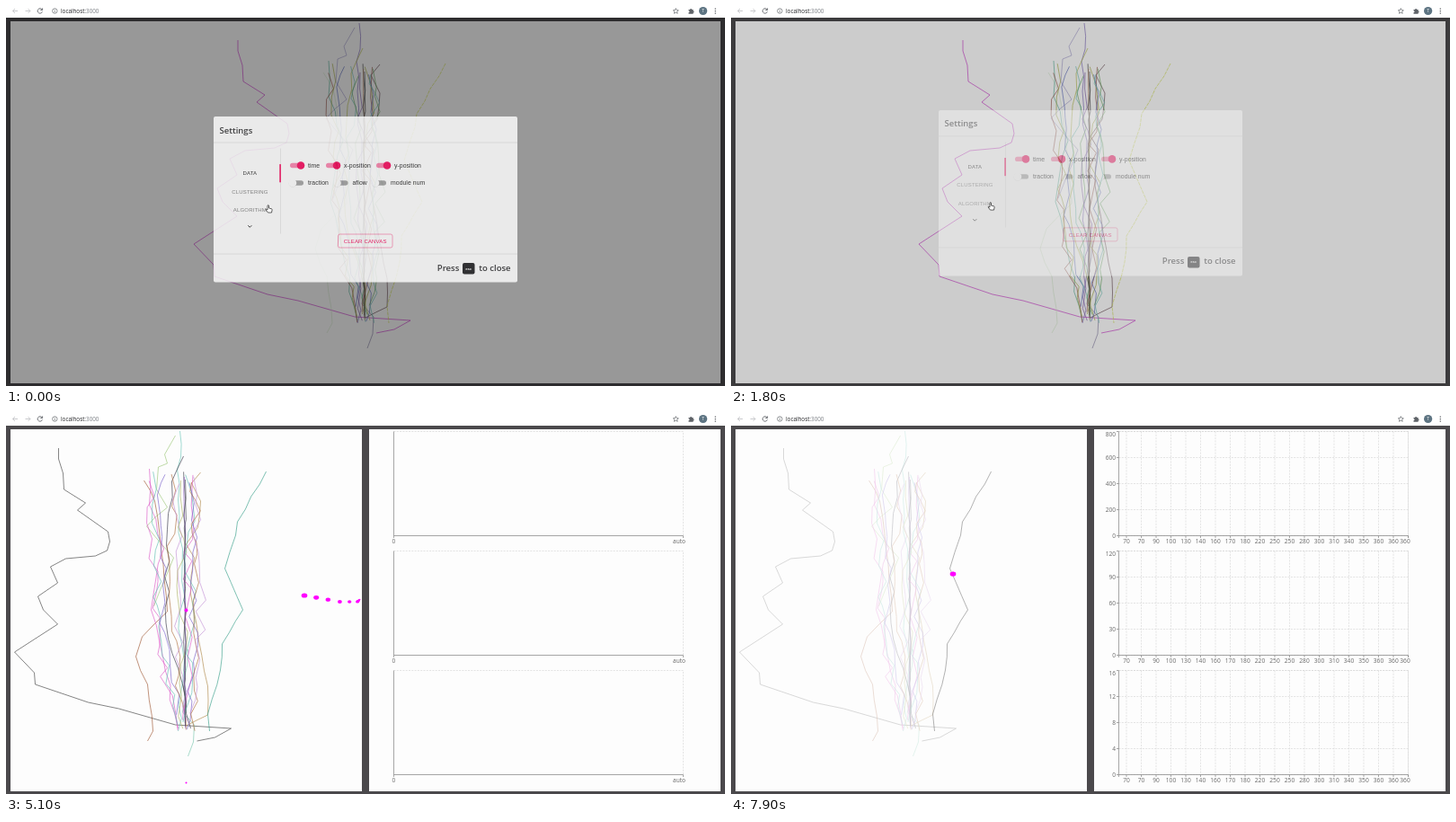
Recreate the animation shown at these times as an HTML page. Size 800 by 423 pixels, loop 8 s.

```html
<!DOCTYPE html>
<html lang="en">
<head>
<meta charset="utf-8">
<title>Trajectory canvas</title>
<style>
  html, body { margin: 0; width: 100%; height: 100%; overflow: hidden; background: #fff; }
  svg { display: block; width: 100%; height: 100%; }
  .ui { font-family: "Open Sans", "Noto Sans", sans-serif; }
  .arial { font-family: "Liberation Sans", Arial, sans-serif; }
  .tab, .btn { font-size: 6px; letter-spacing: .17px; text-anchor: middle; }
  .btn { fill: #f50057; }
  .tick { font-size: 6.6px; fill: #666; }
  .axis { fill: none; stroke: #888; stroke-width: .75; }
  .grid { fill: none; stroke: #d9d9d9; stroke-width: .7; stroke-dasharray: 2 1.3; }
  .line { fill: none; stroke-width: .66; stroke-linejoin: round; }
</style>
</head>
<body>
<svg viewBox="0 0 800 423" preserveAspectRatio="none">
  <defs>
    <clipPath id="tabsClip"><rect x="235" y="179.5" width="72" height="61.5"/></clipPath>
    <clipPath id="panelClip"><rect id="panelRect" x="5" y="17" width="790" height="403"/></clipPath>
  </defs>

  <rect width="800" height="423" fill="#fff"/>
  <rect y="13" width="800" height="410" fill="#4b494c"/>
  <rect x="5" y="17" width="790" height="403" fill="#fdfdfd"/>
  <g clip-path="url(#panelClip)">
    <g id="lines"></g>
    <g id="trail" fill="#f0f"></g>
  </g>
  <g id="split" class="ui">
    <rect x="396" y="17" width="8" height="403" fill="#4b494c"/>
  </g>
  <rect id="backdrop" y="13" width="800" height="410"/>

  <g id="dialog">
    <rect x="231" y="126.5" width="338" height="184.5" rx="2" fill="#fff"/>
    <path d="M231 155.5H569M231 279.5H569M305.5 162V257" stroke="#e2e2e2" stroke-width=".8"/>
    <g class="ui" font-size="9.5" font-weight="600" fill="#2a2a2c">
      <text x="237.5" y="145">Settings</text>
      <text x="479.8" y="298">Press</text>
      <text x="526.3" y="298">to close</text>
    </g>
    <rect x="508" y="289.5" width="13.5" height="12.5" rx="2" fill="#18181a"/>
    <text class="ui" x="514.7" y="297" font-size="4.2" font-weight="700" fill="#fff" text-anchor="middle">esc</text>
    <g class="arial">
      <g clip-path="url(#tabsClip)"><g id="tabs"></g></g>
      <path id="up" d="M269.3 172.2l2-2 2 2" fill="none" stroke="#222"/>
      <path id="down" d="M269.3 247.8l2 2 2-2" fill="none" stroke="#222"/>
      <g id="switches" font-size="6.85" letter-spacing=".06" fill="#222"></g>
      <g id="analysis">
        <rect id="analysisBox" x="368" y="194" width="63.5" height="15" rx="2" fill="#f50057" stroke="#f50057" stroke-width=".8"/>
        <text class="btn" x="399.7" y="203.7">ANALYSIS MODE</text>
      </g>
      <rect x="369.5" y="257.5" width="60.5" height="15" rx="2" fill="none" stroke="#fa80ab" stroke-width=".8"/>
      <text class="btn" x="399.7" y="267.2">CLEAR CANVAS</text>
    </g>
  </g>

  <g id="status">
    <path d="M0 416H264q2 0 2 2v5H0z" fill="#dee1e6"/>
    <text class="ui" x="2" y="421.7" font-size="5.6" fill="#5f6368">Connecting...</text>
  </g>

  <g id="chrome" fill="none" stroke="#5f6368" stroke-width=".9">
    <path d="M13 5.5H7.5M10 3L7.5 5.5 10 8M21.5 5.5H27M24.5 3L27 5.5 24.5 8" stroke="#c4c6c9"/>
    <path id="reload" d="M40 3.8A2.7 2.7 0 1 0 40.4 6.4M40.6 2.4V4.6H38.4"/>
    <path id="stop" d="M35.4 3L40.4 8M40.4 3L35.4 8"/>
    <circle cx="54.3" cy="5.5" r="2.7" stroke-width=".7"/>
    <path d="M54.3 5.2V7.1M54.3 3.8V4.5" stroke-width=".7"/>
    <path d="M745.3 2.6l.9 2 2.1.2-1.6 1.4.5 2.1-1.9-1.1-1.9 1.1.5-2.1-1.6-1.4 2.1-.2z" stroke-width=".7"/>
    <path d="M759.5 4h1.6a1 1 0 0 1 2 0h1.5v1.6a1 1 0 0 1 0 2v1.1h-5.1v-1.4a1 1 0 0 0 0-2z" fill="#5f6368" stroke="none"/>
    <circle cx="775.6" cy="5.5" r="4.6" fill="#5d7482" stroke="none"/>
    <path d="M789.3 2.4v1.3M789.3 4.9v1.3M789.3 7.4v1.3" stroke-width="1.3"/>
    <g class="ui" stroke="none">
      <text x="61" y="7.8" font-size="6.3" fill="#202124">localhost<tspan fill="#777b80">:3000</tspan></text>
      <text x="775.6" y="7.4" font-size="5" fill="#fff" text-anchor="middle">T</text>
    </g>
  </g>

  <path id="hand" d="M-1.5 -4q.9-.8 1.5 .1V-1l3 .8q.8.3.6 1.2L3 4H-1L-3.4 .9q0-1 1-.6l.9.8z"
        fill="#fff" stroke="#222" stroke-width=".7"/>
</svg>
<script>
const LOOP = 8000, STEP = 100, SPLIT = 4700;
const $ = id => document.getElementById(id);
const clamp = v => Math.max(0, Math.min(1, v));
const ramp = (t, from, to) => clamp((t - from) / (to - from));
const ease = v => v * v * (3 - 2 * v);
const mix = (a, b, k) => a + (b - a) * k;
const show = (el, on) => el.setAttribute('display', on ? 'inline' : 'none');
const set = (el, attrs) => { for (const k in attrs) el.setAttribute(k, attrs[k]); return el; };

function add(parent, tag, attrs, text) {
  const el = set(document.createElementNS('http://www.w3.org/2000/svg', tag), attrs);
  if (text !== undefined) el.textContent = text;
  return parent.appendChild(el);
}

let seed = 2024;
function rnd() {
  seed = (seed + 0x6D2B79F5) | 0;
  let r = Math.imul(seed ^ (seed >>> 15), 1 | seed);
  r = (r + Math.imul(r ^ (r >>> 7), 61 | r)) ^ r;
  return ((r ^ (r >>> 14)) >>> 0) / 4294967296;
}
const wobble = size => (rnd() - .5) * size;

// Jagged walk through a few key points, with a joint about every 17 px
function walk(keys, jitter) {
  const pts = keys.split(' ').map(p => p.split(',').map(Number));
  const out = [pts[0]];
  pts.slice(1).forEach(([x, y], i) => {
    const [px, py] = pts[i];
    const n = Math.max(1, Math.round(Math.hypot(x - px, y - py) / 17));
    for (let j = 1; j < n; j++) out.push([mix(px, x, j / n) + wobble(jitter), mix(py, y, j / n)]);
    out.push([x, y]);
  });
  return out.map(p => p.map(v => v.toFixed(1)).join()).join(' ');
}

// Strand of the middle bundle; side runs from -1 (left edge) to 1 (right edge)
function strand(side, jitter) {
  const pts = [];
  for (let y = 64 + rnd() * 14; y < 353; y += 9 + rnd() * 14) {
    const k = ramp(y, 60, 352);
    const width = side < 0 ? 32 * (1 - k ** 3) + 6 : 13 + 9 * Math.sin(k * 3) * k - 6 * k ** 4;
    pts.push(`${(398.5 + side * width + wobble(jitter)).toFixed(1)},${y.toFixed(1)}`);
  }
  return pts.join(' ');
}

const wideTones = ['#9a5a50', '#a9b04c', '#6372c0', '#444', '#74c6bb', '#72b06c', '#8560ac', '#c09070'];
const splitTones = ['#dc5cc8', '#64c0b4', '#7a62cc', '#444450', '#b07040', '#c493d6', '#b0b468', '#8a5ac0'];
const others = add($('lines'), 'g', {});
const walks = [];
function addWalk(points, wide, split) {
  walks.push({ el: add(others, 'polyline', { class: 'line', points }), wide, split });
}

addWalk('258,38 258,50 263,66 264,84 288,99 279,107 313,131 315,142 312,152 299,158 266,161 249,170 257,188 235,203 241,218 257,234 209,265 231,288 232,301 291,321 325,328 388,346 450,350 432,360 412,364', '#cc3ecb', '#454545');
addWalk(walk('353,74 365,97 372,150 379,220 351,248 344,270 357,301 363,353 357,364', 4), '#d9ecd2', '#a05a38');
addWalk(walk('393,19 394,48 390,62 391,95 396,150 394,310 391,353', 7), '#7f6cba', '#70c8ba');
addWalk(walk('388,24 376,45 379,55 369,59 367,84 379,104 356,125 386,160 364,214', 3), '#a9a2d0', '#9fc87c');
addWalk(walk('402,381 408,365 409,346 396,332 402,262', 4), '#8b86a8', '#7cc9b0');
addWalk(walk('359,61 359,101 375,150 361,218 374,270 391,350', 8), '#5db39c', '#dc5cc8');
addWalk(walk('397,47 384,75 378,146 380,250 405,350', 7), '#b8bf55', '#3b3b4c');
addWalk(walk('416,65 406,77 416,97 413,126 400,145 409,160 405,200 424,303 424,335 400,347', 3), '#6c5058', '#b08a4c');
for (let i = 0; i < 14; i++) {
  const central = i % 4 === 3;
  addWalk(strand(central ? 0 : i / 6.5 - 1, central ? 3 : 13), wideTones[i % 8], splitTones[i % 8]);
}
const hovered = add($('lines'), 'polyline', {
  class: 'line', points: walk('489,64 457,120 455,135 443,172 463,218 440,256 438,285 424,334 426,353', 2)
});

// Dialog parts
const tabs = ['DATA', 'CLUSTERING', 'ALGORITHM', 'THRESHOLD', 'OPTIONS'].map((name, i) =>
  add($('tabs'), 'text', { class: 'tab', x: 271.4, y: 191.9 + i * 20.2 }, name));
const marker = add($('tabs'), 'rect', { x: 304.3, width: 1.6, height: 20.2, fill: '#f50057' });

function toggle(x, y, name, on) {
  const g = $('switches');
  add(g, 'rect', { x: x - (on ? 20 : 19), y: y - 2.7, width: on ? 16 : 14, height: 5.4, rx: 2.7, fill: on ? '#fa7fab' : '#9e9e9e' });
  if (!on) add(g, 'circle', { cx: x - 17, cy: y + .5, r: 4.4, fill: '#000', opacity: .08 });
  add(g, 'circle', { cx: x - (on ? 8 : 17), cy: y, r: 4.3, fill: on ? '#f50057' : '#fff' });
  add(g, 'text', { x, y: y + 2.2 }, name);
}
toggle(336, 181, 'time', true);
toggle(376, 181, 'x-position', true);
toggle(432, 181, 'y-position', true);
toggle(336, 200.5, 'traction', false);
toggle(385.5, 200.5, 'aflow', false);
toggle(428, 200.5, 'module num', false);

// Charts
const xLabels = '70 70 90 100 130 140 160 170 180 220 250 250 280 300 310 340 350 360 360 360'.split(' ');
const empty = add($('split'), 'g', {});
const filled = add($('split'), 'g', {});
const label = (parent, x, y, text, anchor = 'middle') =>
  add(parent, 'text', { class: 'tick', x, y, 'text-anchor': anchor }, text);

[200, 30, 4].forEach((unit, n) => {
  const base = 135.5 + n * 133, top = base - 116;
  let grid = '', marks = '';
  xLabels.forEach((text, i) => {
    const x = Math.min(440 + i * 16.5, 753.5);
    grid += `M${x} ${top}V${base}`;
    marks += `M${x} ${base}v2.5`;
    label(filled, Math.min(x, 750), base + 8.2, text);
  });
  for (let i = 0; i < 5; i++) {
    const y = base - i * 29;
    grid += `M431.5 ${y}H753.5`;
    marks += `M431.5 ${y}h-2.5`;
    label(filled, 428, (i < 4 ? y : y + 3) + 2.2, unit * i, 'end');
  }
  add(filled, 'path', { class: 'grid', d: grid });
  add(filled, 'path', { class: 'axis', d: marks });
  label(empty, 431.5, base + 8.2, '0');
  label(empty, 749, base + 8.2, 'auto');
  add($('split'), 'path', { class: 'grid', d: `M431.5 ${top}H753.5V${base}` });
  add($('split'), 'path', { class: 'axis', d: `M431.5 ${top}V${base + 2.5}M431.5 ${base}H753.5v2.5` });
});

// Pointer route: [ms, x, y]
const route = [
  [0, 297, 224], [950, 297, 226], [1200, 358, 178], [1290, 370, 168], [1390, 342, 176], [1500, 316, 198],
  [1600, 302, 210], [2250, 276, 246], [2650, 276, 246], [2900, 290, 226], [3300, 290, 226],
  [3850, 395, 205], [4600, 395, 205], [4970, 391, 209], [5020, 371, 209], [5100, 332, 202],
  [5700, 120, 150], [6000, 64, 205], [6400, 271, 184], [6550, 249, 179], [6900, 249, 179], [7000, 247, 178]
];
function pointer(t) {
  const i = route.findIndex(p => p[0] > t);
  if (i < 0) return route[route.length - 1].slice(1);
  const [t0, x0, y0] = route[i - 1], [t1, x1, y1] = route[i];
  const k = ramp(t, t0, t1);
  return [mix(x0, x1, k), mix(y0, y1, k)];
}

const dots = Array.from({ length: 22 }, () => add($('trail'), 'ellipse', {}));
const sparks = add($('trail'), 'g', {});
add(sparks, 'circle', { cx: 200.5, cy: 218.5, r: 1.9 });
add(sparks, 'circle', { cx: 200.5, cy: 410.5, r: 1 });

function drawTrail(t, split) {
  const start = split ? SPLIT : 300;
  const on = split || t < 1800;
  dots.forEach((dot, i) => {
    const age = i * 27;
    const [cx, cy] = pointer(Math.max(0, t - age));
    const r = on && t - age >= start ? Math.max(.55, 2.9 * Math.exp(-age / 260)) : 0;
    set(dot, { cx, cy, rx: r * 1.15, ry: r * .9 });
  });
  show(sparks, split && t < 5300);
}

function drawLines(t, split) {
  const fade = ramp(t, 7100, 7700);
  walks.forEach(w => set(w.el, { stroke: split ? w.split : w.wide }));
  set($('lines'), { transform: `translate(${split ? -199.5 : 0} 0)` });
  set($('panelRect'), { width: split ? 391 : 790 });
  set(others, { opacity: 1 - .7 * ramp(t, 6900, 7100) });
  set(hovered, {
    stroke: split ? `hsl(167 ${47 * (1 - fade)}% ${43 - 8 * fade}%)` : '#d3df5c',
    'stroke-dasharray': split ? 'none' : '4 1',
    opacity: 1 - .3 * fade
  });
  show($('split'), split);
  show(empty, t < 7900);
  show(filled, t >= 7900);
}

function drawDialog(t, split) {
  const open = split ? 0 : t < 1000 ? Math.max(0, .8 - t / 375) : ease(ramp(t, 1650, 2000));
  set($('backdrop'), { opacity: open / 2 });
  set($('dialog'), { opacity: open, transform: `translate(0 ${-17.5 * (1 - open)})` });

  const scroll = ease(ramp(t, 2350, 2650)) * 40.4;
  const picked = t >= 3100;
  set($('tabs'), { transform: `translate(0 ${-scroll})` });
  set(marker, { y: 179.6 + 80.8 * ease(ramp(t, 3050, 3350)) });
  tabs.forEach((tab, i) => set(tab, { fill: i === (picked ? 4 : 0) ? '#222' : '#777' }));
  show($('up'), scroll > 0);
  show($('down'), scroll < 40);
  show($('switches'), !picked);
  show($('analysis'), picked);
  const hover = t >= 3700, pressed = t >= 4200;
  set($('analysisBox'), { 'fill-opacity': pressed ? .13 : hover ? .05 : 0, 'stroke-opacity': hover ? .8 : .5 });
}

function render(t) {
  const split = t >= SPLIT;
  const loading = t >= 4300 && !split;
  drawLines(t, split);
  drawTrail(t, split);
  drawDialog(t, split);
  show($('stop'), loading);
  show($('reload'), !loading);
  show($('status'), t >= 4400 && !split);

  const [x, y] = pointer(t);
  show($('hand'), !split);
  set($('hand'), { transform: `translate(${x - 4.5} ${y + 2})` });
}

function frame() {
  const t = performance.now() % LOOP;
  render(Math.floor(t / STEP) * STEP);
  requestAnimationFrame(frame);
}
frame();
</script>
</body>
</html>
```
